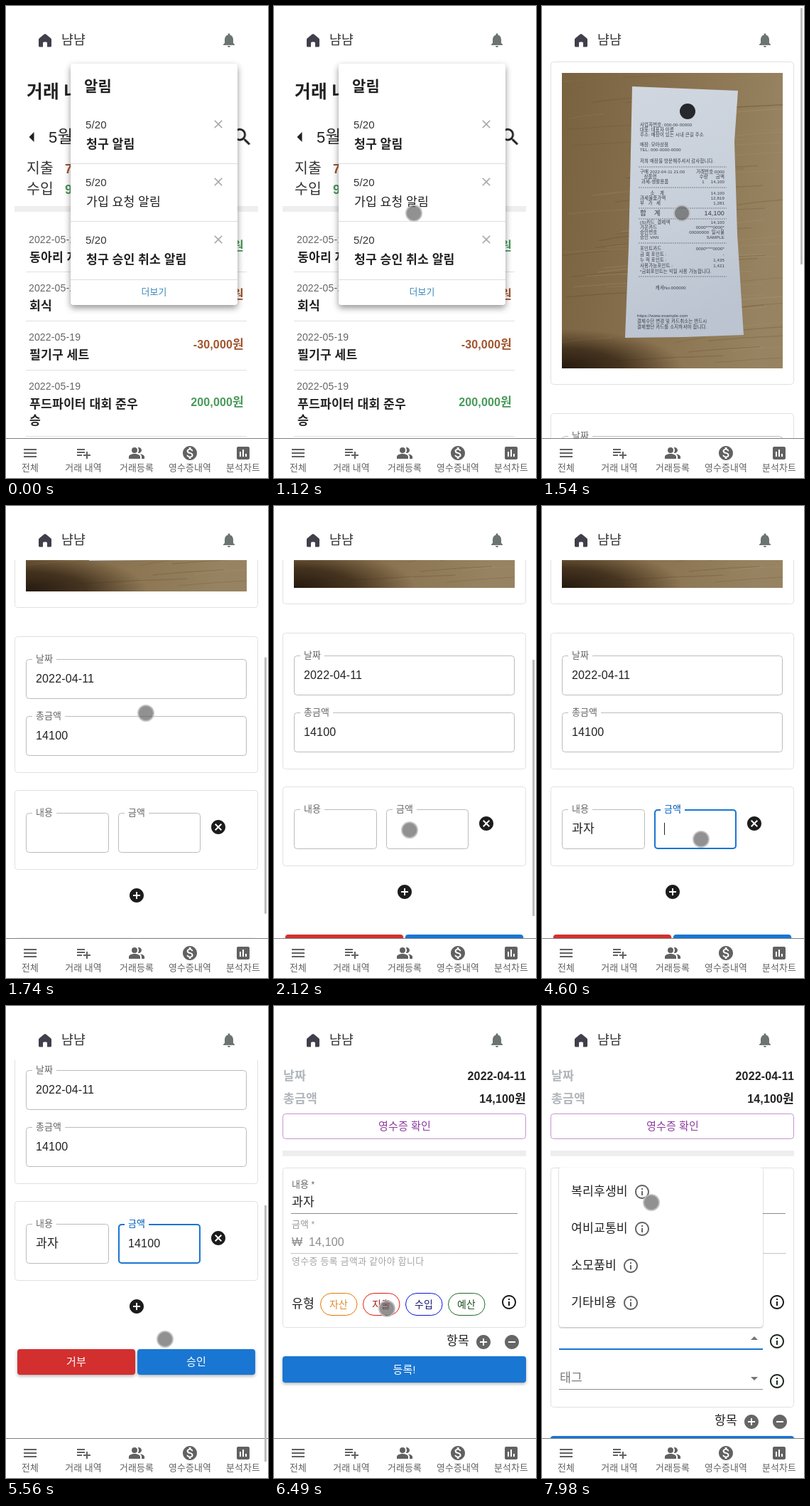
An HTML page that plays this animation: 369x663 px, repeating every 8000 ms.

```html
<!DOCTYPE html>
<html lang="ko">
<head>
<meta charset="utf-8">
<style>
html, body { margin: 0; width: 100%; height: 100%; overflow: hidden; background: #fff; }
svg { display: block; font-family: "Liberation Sans", "Noto Sans CJK KR", "Noto Sans CJK", sans-serif; letter-spacing: .15px; }
text { white-space: pre; }
.raised { filter: drop-shadow(0 2px 2px rgba(0,0,0,.3)); }
.popup { filter: drop-shadow(0 4px 5px rgba(0,0,0,.42)); }
.menu { filter: drop-shadow(0 1px 1px rgba(0,0,0,.32)); }
</style>
</head>
<body>
<svg id="stage" width="369" height="663" viewBox="0 0 369 663"></svg>
<script>
const LOOP = 8000;
const INK = '#212121', GREY = '#666', LINE = '#e0e0e0', BLUE = '#1976d2', RED = '#d32f2f';
const BROWN = '#a0562f', GREEN = '#489a5a';
const stage = document.getElementById('stage');

// Drawing helpers
function add(parent, tag, attrs = {}) {
  const node = document.createElementNS('http://www.w3.org/2000/svg', tag);
  for (const k in attrs) node.setAttribute(k, attrs[k]);
  return parent.appendChild(node);
}
const group = (p, x = 0, y = 0) => add(p, 'g', { transform: `translate(${x} ${y})` });
const fillBox = (p, x, y, width, height, fill, rx = 0, more = {}) =>
  add(p, 'rect', { x, y, width, height, fill, rx, ...more });
const frame = (p, x, y, w, h, stroke, rx = 4, sw = 1) =>
  add(p, 'rect', { x: x + sw / 2, y: y + sw / 2, width: w - sw, height: h - sw, rx, fill: 'none', stroke, 'stroke-width': sw });
const rule = (p, x1, x2, y, color = LINE) => fillBox(p, x1, y, x2 - x1, 1, color);

// Hangul runs are set slightly larger than the Latin ones
function text(p, x, y, size, fill, str, more = {}) {
  const node = add(p, 'text', { x, y, 'font-size': size, fill, ...more });
  for (const run of str.split(/([가-힣ㄱ-ㅎ]+)/)) {
    if (!run) continue;
    const part = add(node, 'tspan', /[가-힣ㄱ-ㅎ]/.test(run) ? { 'font-size': size * 1.075 } : {});
    part.textContent = run;
  }
  return node;
}
const BOLD = { 'font-weight': 700 };
const MID = { 'text-anchor': 'middle' };
const END = { 'text-anchor': 'end' };

const DISC = 'M12 2C6.48 2 2 6.48 2 12s4.48 10 10 10 10-4.48 10-10S17.52 2 12 2z';
const ICON = {
  bell: 'M12 22c1.1 0 2-.9 2-2h-4c0 1.1.89 2 2 2zm6-6v-5c0-3.07-1.64-5.64-4.5-6.32V4c0-.83-.67-1.5-1.5-1.5s-1.5.67-1.5 1.5v.68C7.63 5.36 6 7.92 6 11v5l-2 2v1h16v-1l-2-2z',
  house: 'M12 3.2Q12.8 3.2 13.4 3.8L20.3 9.6Q21 10.3 21 11.2V20Q21 21.5 19.5 21.5H15V16Q15 14.5 13.5 14.5H10.5Q9 14.5 9 16V21.5H4.5Q3 21.5 3 20V11.2Q3 10.3 3.7 9.6L10.6 3.8Q11.2 3.2 12 3.2z',
  menu: 'M3 18h18v-2H3zm0-5h18v-2H3zm0-7v2h18V6z',
  list: 'M14 10H3v2h11zm0-4H3v2h11zm4 8v-4h-2v4h-4v2h4v4h2v-4h4v-2zM3 16h7v-2H3z',
  people: 'M16.67 13.13C18.04 14.06 19 15.32 19 17v3h4v-3c0-2.18-3.57-3.47-6.33-3.87zM15 12c2.21 0 4-1.79 4-4s-1.79-4-4-4c-.47 0-.91.1-1.33.24C14.5 5.27 15 6.58 15 8s-.5 2.73-1.33 3.76c.42.14.86.24 1.33.24zM9 4a4 4 0 1 0 0 8 4 4 0 0 0 0-8zM9 13c-2.67 0-8 1.34-8 4v3h16v-3c0-2.66-5.33-4-8-4z',
  coin: DISC + 'm1.41 16.09V20h-2.67v-1.93c-1.71-.36-3.16-1.46-3.27-3.4h1.96c.1 1.05.82 1.87 2.65 1.87 1.96 0 2.4-.98 2.4-1.59 0-.83-.44-1.61-2.67-2.14-2.48-.6-4.18-1.62-4.18-3.67 0-1.72 1.39-2.84 3.11-3.21V4h2.67v1.95c1.86.45 2.79 1.86 2.85 3.39H14.3c-.05-1.11-.64-1.87-2.22-1.87-1.5 0-2.4.68-2.4 1.64 0 .84.65 1.39 2.67 1.91s4.18 1.39 4.18 3.91c-.01 1.83-1.38 2.83-3.12 3.16z',
  chart: 'M19 3H5c-1.1 0-2 .9-2 2v14c0 1.1.9 2 2 2h14c1.1 0 2-.9 2-2V5c0-1.1-.9-2-2-2zM9 17H7v-7h2zm4 0h-2V7h2zm4 0h-2v-4h2z',
  plus: DISC + 'm5 11h-4v4h-2v-4H7v-2h4V7h2v4h4z',
  minus: DISC + 'm5 11H7v-2h10z',
  cancel: DISC + 'm5 13.59L15.59 17 12 13.41 8.41 17 7 15.59 10.59 12 7 8.41 8.41 7 12 10.59 15.59 7 17 8.41 13.41 12z',
  info: 'M11 7h2v2h-2zm0 4h2v6h-2z' + DISC + 'm0 18c-4.41 0-8-3.59-8-8s3.59-8 8-8 8 3.59 8 8-3.59 8-8 8z',
  close: 'M19 6.41L17.59 5 12 10.59 6.41 5 5 6.41 10.59 12 5 17.59 6.41 19 12 13.41 17.59 19 19 17.59 13.41 12z',
  search: 'M15.5 14h-.79l-.28-.27C15.41 12.59 16 11.11 16 9.5 16 5.91 13.09 3 9.5 3S3 5.91 3 9.5 5.91 16 9.5 16c1.61 0 3.09-.59 4.23-1.57l.27.28v.79l5 4.99L20.49 19zm-6 0C7.01 14 5 11.99 5 9.5S7.01 5 9.5 5 14 7.01 14 9.5 11.99 14 9.5 14z'
};
const icon = (p, name, cx, cy, fill, size = 24) => add(p, 'path', {
  d: ICON[name], fill, 'fill-rule': 'evenodd',
  transform: `translate(${cx - size / 2} ${cy - size / 2}) scale(${size / 24})`
});

// Timing helpers
function track(node, prop, rows) {
  const keys = rows.map(([t, v, easing = 'linear']) => ({ offset: t / LOOP, [prop]: v, easing }));
  node.animate(keys, { duration: LOOP, iterations: Infinity });
}
function show(node, ...spans) {
  const rows = [[0, 0]];
  for (const [a, b] of spans) rows.push([a, 0], [a, 1], [b, 1], [b, 0]);
  track(node, 'opacity', [...rows, [LOOP, 0]]);
  return node;
}
const move = (x, y) => `translate(${x}px, ${y}px)`;

// Transaction list
const ledger = group(stage);
track(ledger, 'opacity', [[0, 1], [1200, 1], [1200, 0], [LOOP, 0]]);
text(ledger, 29, 129, 23, INK, '거래 내역', BOLD);
add(ledger, 'path', { d: 'M39.5 177v14l-7-7z', fill: INK });
text(ledger, 60, 192, 22, INK, '5월');
icon(ledger, 'search', 332.5, 184, '#1a1a1a', 32.4);
[[235, '지출', '70,000원', BROWN], [264, '수입', '900,000원', GREEN]].forEach(([y, name, sum, color]) => {
  text(ledger, 29, y, 19, '#333', name);
  text(ledger, 83, y, 18, color, sum, BOLD);
});
fillBox(ledger, 12, 281, 343, 8, '#eee');
[
  [333, '동아리 지원금', '500,000원', GREEN, 343, 373],
  [401, '회식', '-40,000원', BROWN, 411, 442],
  [470, '필기구 세트', '-30,000원', BROWN, 481, 511],
  [539, '푸드파이터 대회 준우', '200,000원', GREEN, 562, 604]
].forEach(([y, name, sum, color, sumY, lineY]) => {
  text(ledger, 32, y, 14, GREY, '2022-05-19');
  text(ledger, 33, y + 25.5, 16, INK, name, BOLD);
  text(ledger, 335, sumY, 16, color, sum, { ...BOLD, ...END });
  rule(ledger, 28, 339, lineY);
});
text(ledger, 33, 588, 16, INK, '승', BOLD);

// Receipt check page
const receiptPage = show(group(stage), [1200, 5820]);
const scroller = add(receiptPage, 'g');
frame(scroller, 12, 78, 343, 454, LINE);

const defs = add(stage, 'defs');
function gradient(id, tag, attrs, stops) {
  const g = add(defs, tag, { id, ...attrs });
  stops.forEach(([offset, color, alpha = 1]) => add(g, 'stop', { offset, 'stop-color': color, 'stop-opacity': alpha }));
}
gradient('wood', 'linearGradient', { x2: 1, y2: .15 }, [[0, '#79623f'], [.5, '#88714e'], [1, '#978361']]);
gradient('shade', 'radialGradient', { cx: 0, cy: 1, r: .55 }, [[0, '#1a1008', .9], [.5, '#2a1b0e', .7], [1, '#3a2614', 0]]);
gradient('paper', 'linearGradient', { x2: .2, y2: 1 }, [[0, '#d0d7e0'], [.6, '#c7cfda'], [1, '#bbc4d0']]);

function photo(p) {
  fillBox(p, 28, 94, 311, 415, 'url(#wood)');
  let seed = 7;
  const rnd = () => (seed = seed * 16807 % 2147483647) / 2147483647;
  for (let i = 0; i < 90; i++) {
    const x = 28 + rnd() * 250, y = 104 + rnd() * 400, w = Math.min(339 - x, 40 + rnd() * 110);
    add(p, 'path', {
      d: `M${x} ${y}q${w / 2} ${-5} ${w} -7`, fill: 'none',
      stroke: rnd() > .5 ? '#4f3a20' : '#b8a381', opacity: .2, 'stroke-width': .6 + rnd()
    });
  }
  fillBox(p, 28, 409, 311, 100, 'url(#shade)');
  add(p, 'path', { d: 'M127 113L276 119 271 190 275 320 284 462 200 465 117 466 122 340z', fill: 'url(#paper)' });
  add(p, 'circle', { cx: 205, cy: 148, r: 11, fill: '#26282c' });
  [
    [169, '사업자번호: 000-00-00000'], [176, '대표: 대표자 이름'], [183, '주소: 매장이 있는 시내 큰길 주소'],
    [197, '매장: 모아상점'], [204, 'TEL: 000-0000-0000'], [220, '저희 매장을 방문해주셔서 감사합니다.'],
    [235, '구매 2022-04-11 21:00', '거래번호:0000'], [242, '   상품명', '수량      금액'],
    [249, ' 과세-생활용품', '1     14,100'], [265, '        소    계', '14,100'], [272, '과세물품가액', '12,819'],
    [279, '부   가   세', '1,281'], [294, '합    계', '14,100', 9], [306, '(S)카드  결제액', '14,100'],
    [313, '가온카드', '0000****0000*'], [320, '승인번호', '00000000  일시불'], [327, '승인 VAN', 'SAMPLE'],
    [343, '포인트카드', '0000****0000*'], [351, '금 회 포인트 :', '-'], [359, '누 적 포인트 :', '1,435'],
    [367, '사용가능포인트 :', '1,421'], [375, '*금회포인트는 익일 사용 가능합니다.'],
    [398, '            캐셔No:000000'], [437, 'https://www.example.com'],
    [445, '결제수단 변경 및 카드취소는 반드시'], [453, '결제했던 카드를 소지하셔야 합니다.']
  ].forEach(([y, left, right, size = 6]) => {
    text(p, y > 430 ? 134 : 138, y, size, '#363a40', left);
    if (right) text(p, 257, y, size, '#363a40', right, END);
  });
  [226, 255, 284, 299, 333, 380].forEach(y =>
    add(p, 'path', { d: `M136 ${y}H260`, stroke: '#5a5e64', 'stroke-width': .7, 'stroke-dasharray': '2 1' }));
}
photo(scroller);

const form = group(scroller, 0, 394);
frame(form, 12, 178, 343, 192, LINE);
frame(form, 12, 394, 343, 112, LINE);
function field(p, x, y, w, name, focused) {
  frame(p, x, y, w, 56, focused ? BLUE : '#bbb', 4, focused ? 2 : 1);
  fillBox(p, x + 9, y - 1, name.length * 12 + 10, 4, '#fff');
  text(p, x + 14, y + 3.5, 12, focused ? BLUE : GREY, name);
}
field(form, 28, 210, 311, '날짜');
text(form, 42, 243, 16, INK, '2022-04-11');
field(form, 28, 290, 311, '총금액');
text(form, 42, 323, 16, INK, '14100');
field(form, 28, 426, 117, '내용');
field(form, 158, 426, 116, '금액');
const nameFocus = group(form), sumFocus = group(form);
field(nameFocus, 28, 426, 117, '내용', true);
field(sumFocus, 158, 426, 116, '금액', true);
show(nameFocus, [2320, 4340]);
show(sumFocus, [4340, 5820]);
icon(form, 'cancel', 299, 446, '#1c1c1c');
icon(form, 'plus', 184, 542, '#1c1c1c');

function button(p, x, y, w, h, fill, name) {
  fillBox(p, x, y, w, h, fill, 4, { class: 'raised' });
  text(p, x + w / 2, y + h / 2 + 5, 14, '#fff', name, { ...MID, 'font-weight': 500 });
}
button(form, 16, 602, 166, 36, RED, '거부');
button(form, 185, 602, 166, 36, BLUE, '승인');

// Each typed state stays until the next one
function typing(x, states, start, step, end) {
  states.forEach((str, i) => {
    const a = start + i * step, b = i < states.length - 1 ? a + step : end;
    show(text(form, x, 459, 16, INK, str), [a, b]);
  });
}
const caret = (x, ...spans) => show(fillBox(form, x, 445, 1, 17, INK), ...spans);
typing(42, ['ㄱ', '고', '과', '과ㅈ', '과자'], 3390, 75, 5820);
typing(172, ['1', '14', '141', '1410', '14100'], 4750, 80, 5820);
caret(42, [2320, 2580], [2860, 3110]);
caret(58, [3390, 3615]);
caret(74, [3615, 4340]);
caret(172, [4340, 4750]);
[0, 1, 2, 3, 4].forEach(i => caret(181 + i * 9, [4750 + i * 80, i < 4 ? 4830 + i * 80 : 5320]));

track(scroller, 'transform', [
  [0, move(0, 0)], [1550, move(0, 0), 'ease-in-out'], [1840, move(0, -514)],
  [1900, move(0, -514), 'ease-in-out'], [2060, move(0, -394)],
  [5320, move(0, -394), 'ease-in-out'], [5500, move(0, -514)], [LOOP, move(0, -514)]
]);

// Registration page
const entry = show(group(stage), [5820, LOOP]);
[[104, '날짜', '2022-04-11'], [136, '총금액', '14,100원']].forEach(([y, name, value]) => {
  text(entry, 13, y, 16, '#b0b6bb', name, BOLD);
  text(entry, 355, y, 16, INK, value, { ...BOLD, ...END });
});
frame(entry, 12, 151, 343, 36, '#c594d0');
text(entry, 184, 174, 14, '#8e3aa0', '영수증 확인', MID);
fillBox(entry, 12, 203, 343, 8, '#eee');

const EXPAND = 6920, OPEN = 7460;
show(frame(entry, 12, 227, 343, 225, LINE), [5820, EXPAND]);
show(frame(entry, 12, 227, 343, 337, LINE), [EXPAND, LOOP]);
text(entry, 25, 255, 12, GREY, '내용 *');
text(entry, 25, 281, 16, INK, '과자');
rule(entry, 24, 343, 291, '#8c8c8c');
text(entry, 25, 311, 12, '#999', '금액 *');
text(entry, 25, 337, 16, '#8c8c8c', '₩');
text(entry, 49, 337, 16, '#8c8c8c', '14,100');
add(entry, 'path', { d: 'M24 347.5H343', stroke: '#8c8c8c', 'stroke-dasharray': '1 1' });
text(entry, 25, 363, 12, '#a5a5a5', '영수증 등록 금액과 같아야 합니다', { 'letter-spacing': .4 });
text(entry, 25, 424, 16, INK, '유형');
[['자산', '#e07b00', '#e08a2c'], ['지출', '#e01b0c', '#a3241c'], ['수입', '#0a12e0', '#14186e'], ['예산', '#1f6b24', '#1f4d22']]
  .forEach(([name, line, color], i) => {
    frame(entry, 65 + i * 60, 403, 52.5, 32, line, 15.5);
    text(entry, 91 + i * 60, 423.5, 13, color, name, MID);
  });
icon(entry, 'info', 331, 416, '#1c1c1c');

const extra = show(group(entry), [EXPAND, LOOP]);
rule(extra, 24, 311, 482, '#8c8c8c');
rule(extra, 24, 311, 538, '#8c8c8c');
text(extra, 25, 528, 16, '#777', '태그');
add(extra, 'path', { d: 'M294 521h10l-5 5z', fill: '#757575' });
icon(extra, 'info', 331, 471, '#1c2a1c');
icon(extra, 'info', 331, 527, '#1c2a1c');
const closedSelect = show(group(extra), [EXPAND, OPEN]);
text(closedSelect, 25, 472, 16, '#777', '항목');
add(closedSelect, 'path', { d: 'M294 465h10l-5 5z', fill: '#757575' });
const openSelect = show(group(extra), [OPEN, LOOP]);
fillBox(openSelect, 24, 481, 287, 2, BLUE);
add(openSelect, 'path', { d: 'M294 469h10l-5 -5z', fill: '#757575' });

const foot = add(entry, 'g');
text(foot, 243, 476, 16, INK, '항목');
icon(foot, 'plus', 295, 472, '#666');
icon(foot, 'minus', 335, 472, '#666');
button(foot, 12, 492, 343, 37, BLUE, '등록!');
track(foot, 'transform', [[0, move(0, 0)], [EXPAND, move(0, 0)], [EXPAND, move(0, 112)], [LOOP, move(0, 112)]]);

const menu = add(entry, 'g', { style: 'transform-box: fill-box; transform-origin: 50% 100%' });
fillBox(menu, 24, 227, 287, 224, '#fff', 4, { class: 'menu' });
['복리후생비', '여비교통비', '소모품비', '기타비용'].forEach((name, i) => {
  text(menu, 41, 266 + i * 52, 16, INK, name);
  icon(menu, 'info', 61 + name.length * 16, 261 + i * 52, GREY);
});
track(menu, 'opacity', [[0, 0], [OPEN, 0], [7620, 1], [LOOP, 1]]);
track(menu, 'transform', [[0, 'scale(.75, .56)'], [OPEN, 'scale(.75, .56)', 'ease-out'], [7670, 'scale(1, 1)'], [LOOP, 'scale(1, 1)']]);

// Fixed bars
fillBox(stage, 0, 0, 369, 76, '#fff');
icon(stage, 'house', 55, 48, '#403f4b');
text(stage, 78, 54, 17, '#333', '냠냠');
icon(stage, 'bell', 314, 48, '#6c7472');
fillBox(stage, 0, 607, 369, 56, '#fff');
rule(stage, 0, 369, 607, '#808080');
[['menu', '전체'], ['list', '거래 내역'], ['people', '거래등록'], ['coin', '영수증내역'], ['chart', '분석차트']]
  .forEach(([shape, name], i) => {
    icon(stage, shape, 34 + i * 75, 628, '#616161');
    text(stage, 34 + i * 75, 652.5, 12, '#616161', name, MID);
  });

// Notification popup
const popup = add(stage, 'g');
fillBox(popup, 91, 81, 235, 339, '#fff', 4, { class: 'popup' });
text(popup, 110, 120, 19.5, INK, '알림', BOLD);
[['청구 알림', 700], ['가입 요청 알림', 400], ['청구 승인 취소 알림', 700]].forEach(([name, weight], i) => {
  const y = i * 81;
  text(popup, 112, 172 + y, 15, '#333', '5/20');
  text(popup, 113, 199.5 + y, 16, INK, name, { 'font-weight': weight });
  icon(popup, 'close', 299, 166 + y, '#aaa', 20);
  rule(popup, 91, 326, i < 2 ? 221 + y : 384, '#ddd');
});
text(popup, 208.5, 406, 12, '#3a87b8', '더보기', MID);
track(popup, 'opacity', [[0, 1], [1180, 1], [1340, 0], [LOOP, 0]]);

// Scrollbar thumb
const thumb = fillBox(stage, 364, 3, 3, 360, '#bdbdbd');
track(thumb, 'transform', [
  [0, move(0, 0)], [1550, move(0, 0), 'ease-in-out'], [1840, move(0, 277)],
  [1900, move(0, 277), 'ease-in-out'], [2060, move(0, 213)],
  [5320, move(0, 213), 'ease-in-out'], [5500, move(0, 277)], [LOOP, move(0, 277)]
]);
track(thumb, 'opacity', [
  [0, 0], [1540, 0], [1540, 1], [2200, 1], [2320, 0],
  [5320, 0], [5320, 1], [5760, 1], [5880, 0], [LOOP, 0]
]);

// Touch pointer
const pointer = add(stage, 'circle', { r: 11, fill: 'rgba(88,88,88,.66)', stroke: 'rgba(192,192,192,.85)', 'stroke-width': 2 });
track(pointer, 'transform', [
  [0, 390, 200], [770, 390, 200, 'ease-out'], [1080, 197, 291], [1940, 197, 291, 'ease-in-out'],
  [2120, 192, 455, 'ease-out'], [2280, 96, 470], [3900, 96, 470, 'ease-in'], [4080, 150, 484, 'ease-out'],
  [4320, 224, 468], [5580, 224, 468, 'ease-in-out'], [5700, 274, 485],
  [6170, 274, 485, 'ease-in'], [6340, 190, 402, 'ease-out'], [6480, 159, 425],
  [7060, 159, 425, 'ease-in-out'], [7360, 36, 463], [7710, 36, 463, 'ease-in-out'],
  [7970, 154, 276], [LOOP, 154, 276]
].map(([t, x, y, easing]) => [t, move(x, y), easing]));
</script>
</body>
</html>
```
